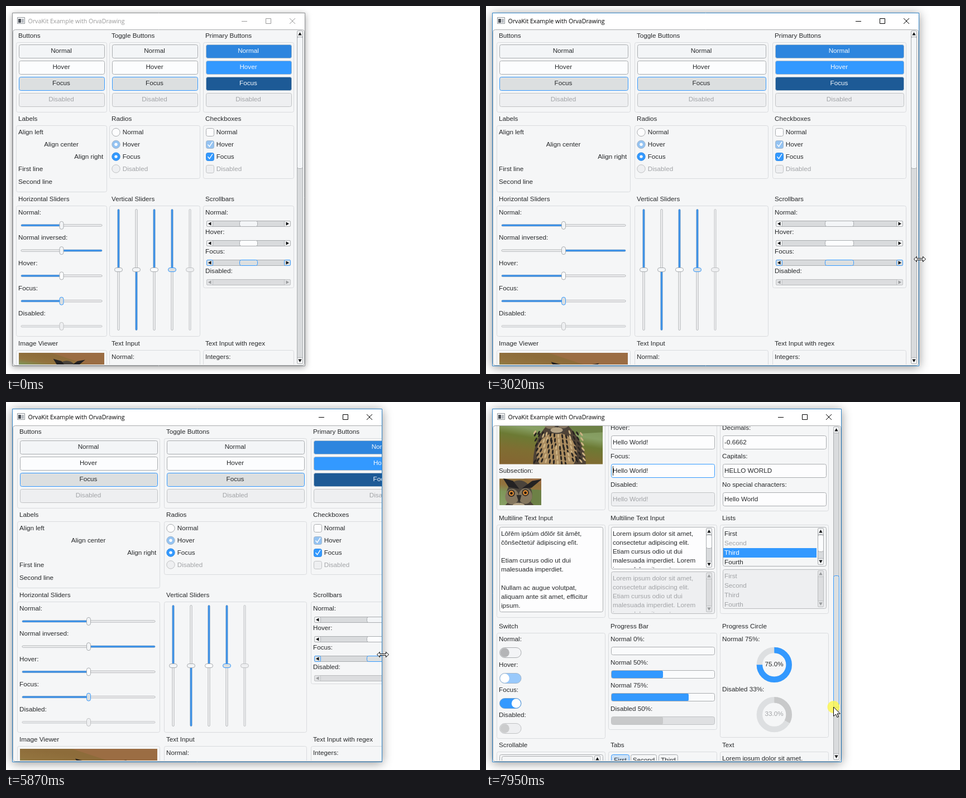
Recreate the animation shown at these times as an HTML page with a canvas. Size 849 by 660 pixels, loop 8 s.

```html
<!DOCTYPE html>
<html lang="en">
<head>
<meta charset="utf-8">
<title>Widget gallery</title>
<style>
html, body { margin: 0; width: 100%; height: 100%; overflow: hidden; background: #fff; }
canvas { display: block; }
</style>
</head>
<body>
<canvas id="stage" width="849" height="660"></canvas>
<script>
const ctx = document.getElementById('stage').getContext('2d');
const LOOP = 8000, INK = '#27292b', BLUE = '#3399ff', GREY = '#a2a4a7', BG = '#f5f6f7';
const FONT = '11.7px "Liberation Sans", Arial, sans-serif';

// state: fill, line, text
const STATES = {
  normal: ['#f3f5f7', '#a9acaf', INK],
  hover: ['#fcfdfe', '#a9acaf', INK],
  focus: ['#dcdfe0', BLUE, INK],
  off: ['#eeeff1', '#c0c2c4', GREY]
};
const NAMES = { normal: 'Normal', hover: 'Hover', focus: 'Focus', off: 'Disabled' };
const KEYS = Object.keys(NAMES);
const INSET = 5.5;
// window right edge: first column, column pitch, column width
const LAYOUTS = { 535: [18, 167.5, 162], 636: [19, 200, 194], 775: [19, 247.2, 239], 825: [20, 263, 255] };

function box(x, y, w, h, r, fill, line) {
  ctx.beginPath();
  ctx.roundRect(x, y, w, h, r);
  paint(fill, line);
}

function paint(fill, line, width = 1) {
  if (fill) { ctx.fillStyle = fill; ctx.fill(); }
  if (line) { ctx.strokeStyle = line; ctx.lineWidth = width; ctx.stroke(); }
}

function poly(points, fill, line, width, open) {
  ctx.beginPath();
  points.forEach(([x, y]) => ctx.lineTo(x, y));
  if (!open) ctx.closePath();
  paint(fill, line, width);
}

function oval(x, y, rx, ry, fill, turn = 0) {
  ctx.beginPath();
  ctx.ellipse(x, y, rx, ry, turn, 0, Math.PI * 2);
  paint(fill);
}

function disc(x, y, r, fill, line) {
  ctx.beginPath();
  ctx.arc(x, y, r, 0, Math.PI * 2);
  paint(fill, line);
}

// y is the middle of the capitals
function text(s, x, y, color = INK, align = 'left', font = FONT) {
  ctx.font = font;
  ctx.textAlign = align;
  ctx.fillStyle = color;
  ctx.fillText(s, x, Math.round(y + 4));
}

function clipped(x, y, w, h, draw) {
  ctx.save();
  ctx.beginPath();
  ctx.rect(x, y, w, h);
  ctx.clip();
  draw();
  ctx.restore();
}

// draws along a horizontal axis, or a vertical one by swapping axes
function along(x, y, vert, draw) {
  ctx.save();
  ctx.translate(x, y);
  if (vert) ctx.transform(0, 1, 1, 0, 0, 0);
  draw();
  ctx.restore();
}

function scrollbar(x, y, len, vert, from, size, state) {
  const off = state === 'off', line = STATES[state][1];
  along(x, y, vert, () => {
    box(0, 0, len, 10, 2, off ? '#dcdddf' : '#d9dbdd', off ? '#b9bbbd' : '#a9acaf');
    for (const [at, dir] of [[0, 1], [len - 11, -1]]) {
      box(at, 0, 11, 10, 2, off ? '#e3e4e6' : state === 'focus' && !vert ? '#dcdfe0' : BG,
        vert && state === 'focus' ? '#a9acaf' : line);
      const m = at + 5.5;
      poly([[m - 3 * dir, 5], [m + 2.5 * dir, 1.8], [m + 2.5 * dir, 8.2]], off ? '#9a9c9e' : '#16181a');
    }
    if (size) box(Math.round(from), 0, Math.round(size), 10, 3, STATES[state][0], line);
  });
}

function slider(x, y, len, vert, state, side) {
  const mid = len / 2, [fill, line] = STATES[state];
  along(x, y, vert, () => {
    box(0, -1.5, len, 3, 1.5, state === 'off' ? '#eeeff1' : '#fcfcfd', line === BLUE ? '#a9acaf' : line);
    if (side) box(side < 0 ? 0 : mid, -1.7, mid, 3.4, 1.5, '#3f92e6');
    box(mid - 3.5, -7, 7, 14, 3.5, fill, line);
  });
}

function owl(x, y, w) {
  ctx.save();
  ctx.translate(x, y);
  ctx.scale(w / 184, w / 184);
  ctx.beginPath();
  ctx.rect(0, 0, 184, 123);
  ctx.clip();
  const g = ctx.createLinearGradient(20, 0, 0, 123);
  [[0, '#8d6c3a'], [.12, '#93743f'], [.22, '#7f965a'], [.42, '#88a065'], [.55, '#6c7a34'], [.75, '#7f6e32'], [1, '#866432']]
    .forEach(([at, c]) => g.addColorStop(at, c));
  ctx.fillStyle = g;
  ctx.fillRect(0, 0, 184, 123);
  poly([[70, 0], [184, 0], [184, 36], [130, 20]], '#9b6d43');
  poly([[115, 32], [184, 38], [184, 66], [115, 70]], '#6d8146');

  // body with a dark back and a streaked breast
  ctx.beginPath();
  ctx.moveTo(84, 55);
  ctx.bezierCurveTo(66, 72, 60, 100, 60, 123);
  ctx.lineTo(154, 123);
  ctx.bezierCurveTo(154, 100, 143, 75, 123, 55);
  paint('#4e4236');
  oval(102, 103, 36, 36, '#a98b5f');
  for (let i = 0; i < 90; i++) {
    const px = 63 + (i * 37) % 89, py = 66 + (i * 23) % 57;
    oval(px, py, 1.5, 4, i % 3 ? '#282420' : '#cdb384', (102 - px) / 70);
  }

  oval(103, 43, 23, 26, '#4a433b');
  oval(90, 46, 12, 14, '#85775f');
  oval(114, 45, 12, 14, '#85775f');
  oval(102, 62, 11, 5, '#b5a487');
  poly([[74, 13], [92, 18], [103, 32], [84, 29]], '#242223');
  poly([[143, 15], [126, 18], [108, 31], [125, 30]], '#242223');
  poly([[98, 43], [107, 43], [103, 58]], '#2f2c2a');
  for (const [ex, ey] of [[89, 40], [114, 39]]) {
    disc(ex, ey, 6.2, '#2c2622');
    disc(ex, ey, 4.6, '#d98a35');
    disc(ex, ey, 2.3, '#15100d');
  }
  ctx.restore();
}

function field(x, y, w, s, state = 'hover') {
  box(x + INSET, y, w - 9, 24, 3, state === 'off' ? '#eeeff1' : '#fdfdfe', STATES[state][1]);
  text(s, x + 8, y + 11.5, STATES[state][2]);
  if (state === 'focus') { ctx.fillStyle = INK; ctx.fillRect(x + 8, y + 3.5, 1, 17); }
}

function group(title, x, w, top, bottom) {
  text(title, x + 4, top - 12);
  box(x + .5, top + .5, w, bottom - top, 3, null, '#d9dbde');
}

function lines(list, x, y, step, color) {
  list.forEach((s, i) => text(s, x, y + i * step, color));
}

function buttons(x, w, primary) {
  KEYS.forEach((key, i) => {
    let [fill, line, ink] = STATES[key];
    if (primary && i < 3) {
      fill = ['#2d85de', BLUE, '#1d5a96'][i];
      line = '#a9bccd';
      ink = '#f4f8fd';
    }
    const y = Math.floor(69 + i * 29.3);
    box(x + INSET, y + .5, w - 9, 24, 3, fill, line);
    text(NAMES[key], x + w / 2, y + 11.4, ink, 'center');
  });
}

function choices(x, round) {
  KEYS.forEach((key, i) => {
    const y = 226.2 + i * 21.8, on = i === 1 || i === 2;
    const fill = ['#fdfdfe', '#94c3f2', BLUE, '#eeeff1'][i], line = on ? (i === 1 ? '#a3b6ca' : '#2f8ae6') : STATES[key][1];
    if (round) {
      disc(x + 12, y + .3, 7.2, fill, line);
      if (on) disc(x + 12, y + .3, 2.7, '#fff');
    } else {
      box(x + INSET, Math.round(y) - 6.5, 14, 14, 3, fill, line);
      if (on) poly([[x + 8.5, y + .5], [x + 11.5, y + 4], [x + 17, y - 4.5]], null, '#fff', 1.4, true);
    }
    text(NAMES[key], x + 23.7, y, STATES[key][2]);
  });
}

function ring(x, y, part, color, ink) {
  const arc = (a, b, c) => {
    ctx.beginPath();
    ctx.arc(x + .3, y + .3, 26.4, a, b);
    paint(null, c, 10.5);
  };
  arc(0, Math.PI * 2, '#dddfe1');
  arc(-Math.PI / 2, (part * 2 - .5) * Math.PI, color);
  text((part * 100).toFixed(1) + '%', x, y - 1, ink, 'center');
}

function upperRows([a, b, c], w) {
  group('Buttons', a, w, 65, 190);
  group('Toggle Buttons', b, w, 65, 190);
  group('Primary Buttons', c, w, 65, 190);
  [a, b, c].forEach((x, i) => buttons(x, w, i === 2));

  group('Labels', a, w, 214, 333);
  text('Align left', a + 4, 226);
  text('Align center', a + w / 2, 248, INK, 'center');
  text('Align right', a + w - 5.7, 270, INK, 'right');
  text('First line', a + 4, 291.5);
  text('Second line', a + 4, 315);
  group('Radios', b, w, 214, 309);
  choices(b, true);
  group('Checkboxes', c, w, 214, 309);
  choices(c, false);

  group('Horizontal Sliders', a, w, 358, 592);
  [['Normal:', 'normal', -1], ['Normal inversed:', 'normal', 1], ['Hover:', 'hover', -1],
    ['Focus:', 'focus', -1], ['Disabled:', 'off', 0]].forEach(([s, state, side], i) => {
    const y = 370 + i * 45.25;
    text(s, a + 4, y);
    slider(a + 9, y + 23.4, w - 17, false, state, side);
  });
  group('Vertical Sliders', b, w, 358, 592);
  [['normal', -1], ['normal', 1], ['hover', -1], ['focus', -1], ['off', 0]].forEach(([state, side], i) =>
    slider(b + 16.5 + i * 32, 364.5, 217, true, state, side));
  group('Scrollbars', c, w, 358, 505);
  KEYS.forEach((key, i) => {
    const y = 370 + i * 34.9, len = w - 12, run = len - 22;
    text(NAMES[key] + ':', c + 4, y);
    scrollbar(c + 6.5, Math.round(y + 15) + .5, len, false, 11 + run * .375, key === 'off' ? 0 : run / 4, key);
  });
}

function lowerRows([a, b, c], w) {
  group('Image Viewer', a, w, 617, 827);
  owl(a + 5, 622, w - 9);
  text('Subsection:', a + 4, 757);
  clipped(a + 5, 771.5, 75, 47.5, () => owl(a + 5 - 68, 757.5, w - 9));
  group('Text Input', b, w, 617, 829);
  group('Text Input with regex', c, w, 617, 829);
  const rules = [['Integers:', '-0123'], ['Decimals:', '-0.6662'], ['Capitals:', 'HELLO WORLD'], ['No special characters:', 'Hello World']];
  KEYS.forEach((key, i) => {
    const y = 629 + i * 51;
    text(NAMES[key] + ':', b + 4, y);
    field(b, y + 14.5, w, 'Hello World!', key);
    text(rules[i][0], c + 4, y);
    field(c, y + 14.5, w, rules[i][1]);
  });

  group('Multiline Text Input', a, w, 854, 1020);
  box(a + INSET, 858.5, w - 9, 152, 3, '#fdfdfe', '#a9acaf');
  lines(['Lôřěm ipšúm dőlőr šit ămět,', 'čônšečtetúř ädipiscing eľit.', '', 'Etiam cursus odio ut dui',
    'malesuada imperdiet.', '', 'Nullam ac augue volutpat,', 'aliquam ante sit amet, efficitur', 'ipsum.'], a + 8, 870, 16.1);
  group('Multiline Text Input', b, w, 854, 1022);
  group('Lists', c, w, 854, 1013);
  const lorem = ['Lorem ipsum dolor sit amet,', 'consectetur adipiscing elit.', 'Etiam cursus odio ut dui', 'malesuada imperdiet. Lorem', 'ipsum dolor sit amet,'];
  for (const off of [false, true]) {
    const state = off ? 'off' : 'hover', y = off ? 938.5 : 858.5, z = off ? 934.5 : 858.5;
    const fill = off ? '#eeeff1' : '#fdfdfe', line = off ? '#b9bbbd' : '#a9acaf';
    box(b + INSET, y, w - 9, 75, 3, fill, line);
    clipped(b + 6, y, w - 28, 73.5, () => lines(lorem, b + 8, y + 11.4, 16, off ? GREY : INK));
    scrollbar(b + w - 18.5, y + 2, 70, true, 12, off ? 0 : 24, state);
    box(c + INSET, z, w - 9, 70, 3, off ? '#eeeff1' : BG, line);
    if (!off) { ctx.fillStyle = BLUE; ctx.fillRect(c + 6, z + 37.5, w - 27, 17); }
    ['First', 'Second', 'Third', 'Fourth'].forEach((s, i) =>
      text(s, c + 8, z + 11 + i * 17, off || i === 1 ? GREY : i === 2 ? '#fff' : INK));
    scrollbar(c + w - 18.5, z + 2, 65, true, 12, off ? 0 : 30, state);
  }

  group('Switch', a, w, 1048, 1237);
  KEYS.forEach((key, i) => {
    const y = Math.round(1059.4 + i * 45.2), on = key === 'focus';
    text(NAMES[key] + ':', a + 4, y);
    box(a + INSET, y + 15.5, 38.5, 18, 9, ['#f3f4f6', '#99c9fb', BLUE, '#eeeff1'][i], ['#a9acaf', '#a3b6ca', '#6f9fce', '#c0c2c4'][i]);
    disc(a + (on ? 35 : 14.6), y + 24.5, 8.2, ['#b4b5b7', '#fff', '#fff', '#cbcccd'][i]);
  });
  group('Progress Bar', b, w, 1048, 1221);
  [['Normal 0%:', 0], ['Normal 50%:', .5], ['Normal 75%:', .75], ['Disabled 50%:', .5]].forEach(([s, part], i) => {
    const y = Math.round(1059.4 + i * 41.5);
    text(s, b + 4, y);
    box(b + INSET, y + 14.5, w - 9, 14, 3, i < 3 ? '#fafbfc' : '#dfe0e2', i < 3 ? '#a9acaf' : '#c0c2c4');
    if (part) box(b + 6, y + 15, (w - 10) * part, 13, 2, i < 3 ? BLUE : '#c8c9ca');
  });
  group('Progress Circle', c, w, 1048, 1235);
  text('Normal 75%:', c + 4, 1059.4);
  ring(c + w / 2, 1105, .75, BLUE, INK);
  text('Disabled 33%:', c + 4, 1149);
  ring(c + w / 2, 1194.4, .33, '#c8c9ca', GREY);

  group('Scrollable', a, w, 1261, 1400);
  box(a + INSET, 1266.5, w - 9, 100, 3, null, '#a9acaf');
  box(a + 9.5, 1269.5, 163, 24, 3, BG, '#a9acaf');
  text('Button with text', a + 91, 1281, INK, 'center');
  scrollbar(a + w - 18.5, 1268.5, 96, true, 12, 30, 'hover');
  group('Tabs', b, w, 1261, 1400);
  [['First', 5.5, 32], ['Second', 40.5, 46], ['Third', 90.5, 34]].forEach(([s, x, tw], i) => {
    box(b + x, 1266.5, tw, 24, 3, i ? BG : '#cfe2f5', i ? '#a9acaf' : BLUE);
    text(s, b + x + tw / 2, 1276, INK, 'center');
  });
  group('Text', c, w, 1261, 1400);
  text('Lorem ipsum dolor sit amet,', c + 4, 1273);
}

function frame(right, active) {
  ctx.save();
  ctx.shadowColor = active ? 'rgba(0,0,0,.42)' : 'rgba(0,0,0,.36)';
  ctx.shadowBlur = active ? 17 : 11;
  ctx.shadowOffsetY = 2;
  ctx.fillStyle = '#fff';
  ctx.fillRect(11, 12, right - 10, 634);
  ctx.restore();
  const ink = active ? '#000' : '#999';
  box(20.5, 20.5, 13, 11, 0, '#fafafa', '#8f9499');
  ctx.fillStyle = '#4b5158';
  ctx.fillRect(22, 23, 5, 7);
  ctx.fillStyle = '#b5babf';
  ctx.fillRect(28, 23, 4, 7);
  text('OrvaKit Example with OrvaDrawing', 39.5, 27, ink, 'left', '10.6px "Open Sans", "Noto Sans", sans-serif');
  poly([[right - 113, 27.5], [right - 103, 27.5]], null, ink, 1, true);
  box(right - 69.5, 22.5, 9, 9, 0, null, ink);
  const x = right - 27, y = 22;
  poly([[x, y], [x + 10, y + 10]], null, ink, 1, true);
  poly([[x + 10, y], [x, y + 10]], null, ink, 1, true);
}

function client(right, edge, scroll, thumb) {
  const [first, pitch, w] = LAYOUTS[edge];
  const cols = [0, 1, 2].map(i => Math.floor(first + i * pitch));
  clipped(12, 41, right - 12, 604, () => {
    box(12.5, 42.5, edge - 13, 602, 4, BG, '#a9abad');
    clipped(14, 43, edge - 15, 600, () => {
      ctx.translate(0, -scroll);
      upperRows(cols, w);
      lowerRows(cols, w);
    });
    scrollbar(edge - 13.5, 44.5, 597, true, 11 + scroll * .403, 236, thumb);
  });
}

function arrow(x, y) {
  ctx.save();
  ctx.translate(x, y);
  poly([[0, 0], [0, 16.5], [4, 13], [6.5, 18.5], [9, 17.5], [6.5, 12], [11.8, 12]], '#fff', '#000');
  ctx.restore();
}

function sizer(x, y) {
  ctx.save();
  ctx.translate(x, y);
  const half = [[-10.5, 0], [-5.5, -4.7], [-5.5, -1.3], [5.5, -1.3], [5.5, -4.7]];
  poly([...half, ...half.map(([px, py]) => [-px, -py])], '#fff', '#000');
  ctx.restore();
}

// number of steps already taken in a run of n steps
function taken(t, from, to, n) {
  if (t < from) return 0;
  return Math.min(n, Math.floor((t - from) / (to - from) * (n - 1) + .1) + 1);
}
const ease = p => { p = Math.max(0, Math.min(1, p)); return p * p * (3 - 2 * p); };
const mix = (a, b, p) => a + (b - a) * p;

const SCROLLS = [0, 40, 125, 228, 332, 424, 506, 578, 634];
const DRAG_X = [628.5, 628, 624, 621, 619.5, 619.5, 620, 621, 622.5];

function draw(t) {
  const enter = taken(t, 540, 1060, 6);
  const grow = ease(taken(t, 2150, 2920, 8) / 8);
  const more = ease(taken(t, 3900, 4670, 8) / 7);
  const shrink = ease(taken(t, 5440, 6200, 8) / 7);
  const lift = taken(t, 6420, 7190, 8);
  const drag = t < 7190 ? 0 : 1 + taken(t, 7290, 7950, 7);
  const right = Math.round(535 + 240 * grow + 50 * more - 189 * shrink);
  const edge = t < 3020 ? 535 : t < 4670 ? 775 : t < 6200 ? 825 : 636;
  const scroll = SCROLLS[drag];
  const active = t >= 1820;

  ctx.fillStyle = '#fff';
  ctx.fillRect(0, 0, 849, 660);
  frame(right, active);
  client(right, edge, scroll, drag ? 'focus' : lift >= 5 ? 'hover' : 'normal');
  ctx.beginPath();
  ctx.rect(11.5, 12.5, right - 11, 633);
  paint(null, active ? '#2f83c6' : '#8b8d8f');

  if (lift) {
    const p = ease(lift / 7);
    const x = drag ? DRAG_X[drag] : mix(639, 628.5, p);
    const y = drag ? 291.5 + scroll * .403 : mix(453, 284, p);
    if (lift >= 7) disc(x, y, 11, drag > 1 && drag < 6 ? 'rgba(218,208,72,.8)' : 'rgba(252,248,72,.8)');
    arrow(x, y);
  } else if (t >= 1390) {
    sizer(right + 2, 460 - 6 * grow - more);
  } else if (enter) {
    const p = ease((enter - 1) / 5);
    arrow(mix(739, 535, p), mix(624, 461, p));
  }
}

const start = performance.now();
function tick() {
  draw((performance.now() - start) % LOOP);
  requestAnimationFrame(tick);
}
tick();
</script>
</body>
</html>
```
